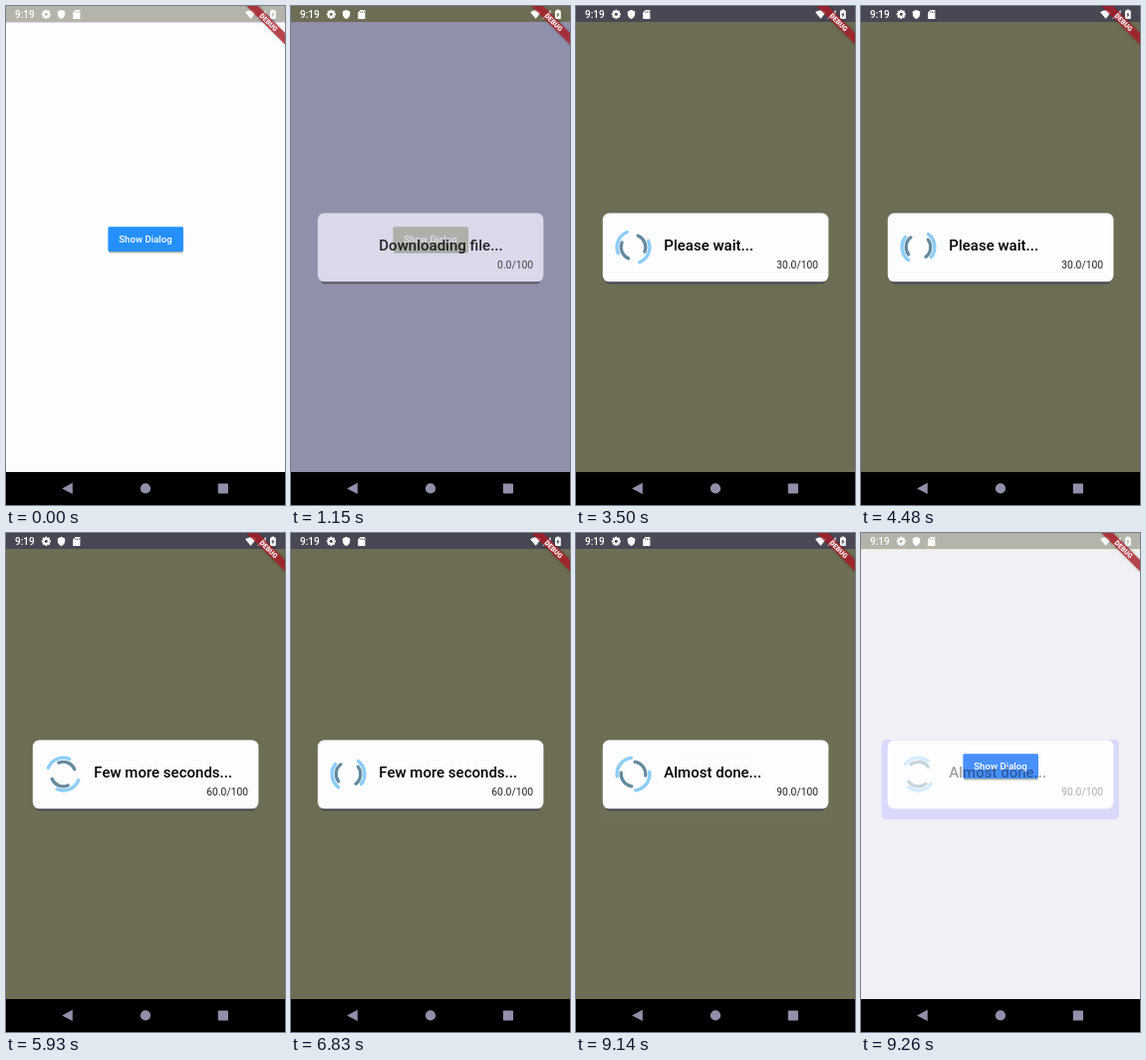
Animation, 280 px wide and 500 px high, one loop 9.71 s. Source, as an HTML page with a canvas:

```html
<!DOCTYPE html>
<html lang="en">
<head>
<meta charset="utf-8">
<title>Progress dialog</title>
<style>
  html, body { margin: 0; width: 100%; height: 100%; overflow: hidden; background: #fdfdff; }
  canvas, svg { position: absolute; left: 0; top: 0; width: 280px; height: 500px; }
  text { font-family: Roboto, "Noto Sans", sans-serif; }
</style>
</head>
<body>
<canvas id="stage"></canvas>
<svg viewBox="0 0 280 500">
  <text x="9" y="12" font-size="10" font-weight="500" fill="#fff">9:19</text>
  <text id="label" x="140" y="237" font-size="9.6" font-weight="500" text-anchor="middle">Show Dialog</text>
  <text id="message" x="88.3" y="245.2" font-size="15" font-weight="500"></text>
  <text id="count" x="243" y="262.8" font-size="10.3" text-anchor="end"></text>
  <text transform="translate(280 0) rotate(45)" x="0" y="25.6" font-size="6.9" font-weight="900" fill="#fff" text-anchor="middle">DEBUG</text>
</svg>
<script>
const LOOP = 9710;
const $ = id => document.getElementById(id);
const canvas = $('stage'), ctx = canvas.getContext('2d');
const dpr = window.devicePixelRatio || 1;
canvas.width = 280 * dpr;
canvas.height = 500 * dpr;
ctx.scale(dpr, dpr);

const closed = { bg: [253, 253, 255], bar: [180, 180, 170], edge: [220, 220, 245], panel: [253, 253, 255], btn: [36, 144, 255],
  label: [255, 255, 255], panelA: 0, btnA: 1, ink: 0, spin: 0, glow: 0, rim: 0 };
const opening = { bg: [144, 144, 171], bar: [109, 109, 85], edge: [144, 144, 171], panel: [217, 217, 234], btn: [176, 176, 170],
  label: [222, 222, 240], panelA: 1, btnA: 1, ink: .82, spin: 0, glow: 0, rim: .8 };
const open = { bg: [109, 109, 85], bar: [72, 72, 85], edge: [109, 109, 85], panel: [253, 253, 255], btn: [176, 176, 170],
  label: [253, 253, 255], panelA: 1, btnA: 0, ink: 1, spin: 1, glow: 0, rim: 1 };
const closing = { bg: [241, 241, 245], bar: [180, 180, 170], edge: [236, 236, 215], panel: [253, 253, 255], btn: [72, 144, 255],
  label: [255, 255, 255], panelA: 1, btnA: 1, ink: .36, spin: .36, glow: 1, rim: 0 };
const poses = [[0, closed], [1070, closed], [1150, opening], [1199, opening], [1200, open],
  [9140, open], [9260, closing], [LOOP, closing]];

// Ring position in 15 degree ticks
const ticks = [[1150, -28], [2510, 0], [2600, 0], [4480, 41], [4590, 41], [5930, 70], [7740, 110], [9260, 143], [LOOP, 143]];

const messages = [[7080, 'Almost done...', '90.0/100'], [5080, 'Few more seconds...', '60.0/100'],
  [3080, 'Please wait...', '30.0/100'], [0, 'Downloading file...', '0.0/100']];

const mix = (a, b, k) => a + (b - a) * k;
const rgb = c => `rgb(${c.map(Math.round).join()})`;

function span(keys, t) {
  let i = keys.length - 2;
  while (i > 0 && keys[i][0] > t) i--;
  const [t0, a] = keys[i], [t1, b] = keys[i + 1];
  return [a, b, Math.max(0, (t - t0) / (t1 - t0))];
}

function poseAt(t) {
  const [a, b, k] = span(poses, t), p = {};
  for (const n in a) p[n] = Array.isArray(a[n]) ? a[n].map((v, i) => mix(v, b[n][i], k)) : mix(a[n], b[n], k);
  return p;
}

function rect(x, y, w, h, color, r = 0) {
  ctx.fillStyle = color;
  ctx.beginPath();
  ctx.roundRect(x, y, w, h, r);
  ctx.fill();
}

function poly(color, ...pts) {
  ctx.fillStyle = color;
  ctx.beginPath();
  pts.forEach(([x, y]) => ctx.lineTo(x, y));
  ctx.fill();
}

function disc(x, y, r, color) {
  ctx.fillStyle = color;
  ctx.beginPath();
  ctx.arc(x, y, r, 0, 7);
  ctx.fill();
}

function statusIcons(bar) {
  const white = '#fff';
  // Gear
  for (let i = 0; i < 4; i++) {
    ctx.save();
    ctx.translate(40.3, 8.3);
    ctx.rotate(i * Math.PI / 4);
    rect(-1, -4.6, 2, 9.2, white);
    ctx.restore();
  }
  disc(40.3, 8.3, 3.5, white);
  disc(40.3, 8.3, 1.5, bar);
  // Shield
  ctx.fillStyle = white;
  ctx.beginPath();
  ctx.moveTo(55.5, 3.8);
  ctx.lineTo(59.2, 5.4);
  ctx.lineTo(59.2, 8);
  ctx.quadraticCurveTo(59, 11.5, 55.5, 13);
  ctx.quadraticCurveTo(52, 11.5, 51.8, 8);
  ctx.lineTo(51.8, 5.4);
  ctx.fill();
  // Memory card
  poly(white, [69.7, 4], [74.4, 4], [74.4, 13], [67.2, 13], [67.2, 6.5]);
  [69.5, 71.2, 72.9].forEach(x => rect(x, 5.2, .7, 1.8, bar));
  // Wifi
  ctx.fillStyle = white;
  ctx.beginPath();
  ctx.moveTo(245.6, 12.8);
  ctx.arc(245.6, 12.8, 8.6, -2.26, -.88);
  ctx.fill();
  // Signal and battery
  poly(white, [260.6, 4], [260.6, 12.6], [252, 12.6]);
  rect(265, 4.6, 5.8, 8.4, white, .8);
  rect(266.6, 3.6, 2.6, 1.4, white);
  poly(bar, [268.5, 5.8], [266.2, 9.2], [267.6, 9.2], [267.2, 11.8], [269.6, 8.2], [268.2, 8.2]);
}

function navBar() {
  const grey = '#9090aa';
  rect(0, 467, 280, 33, '#000');
  poly(grey, [56.2, 483.4], [66.8, 477.8], [66.8, 489]);
  disc(140, 483.4, 5.1, grey);
  rect(212.8, 478.4, 10.2, 10.2, grey, .8);
}

function banner() {
  ctx.save();
  ctx.translate(280, 0);
  ctx.rotate(Math.PI / 4);
  ctx.shadowColor = 'rgba(0,0,0,.4)';
  ctx.shadowBlur = 3 * dpr;
  rect(-28, 19.1, 56, 8.2, 'rgba(183,28,40,.75)');
  ctx.restore();
}

function ring(r, width, color, angle) {
  ctx.strokeStyle = color;
  ctx.lineWidth = width;
  for (const turn of [0, Math.PI]) {
    const mid = angle * Math.PI / 180 - Math.PI / 2 + turn;
    ctx.beginPath();
    ctx.arc(57.5, 241.6, r, mid - Math.PI / 4, mid + Math.PI / 4);
    ctx.stroke();
  }
}

function spinner(t, alpha) {
  const [a, b, k] = span(ticks, t);
  const angle = 7.5 + 15 * Math.floor(mix(a, b, k) + 1e-6);
  ctx.lineCap = 'round';
  ctx.globalAlpha = alpha;
  ring(16.4, 3.4, '#8ccdf8', angle);
  ring(12.3, 3.2, '#648a9e', -angle);
  ctx.globalAlpha = 1;
}

function draw(t) {
  const p = poseAt(t);
  rect(0, 0, 280, 500, rgb(p.bg));
  rect(0, 0, 280, 16, rgb(p.bar));
  rect(0, 16, 280, 1, rgb(p.edge));
  statusIcons(rgb(p.bar));

  ctx.globalAlpha = p.glow;
  rect(20.5, 207, 238.5, 80, '#d9d9fb', 5);
  ctx.globalAlpha = p.rim;
  rect(29.5, 270, 221, 8.6, '#4b4b52', 5);
  ctx.globalAlpha = p.panelA;
  rect(26.8, 207.5, 226.6, 68.8, rgb(p.panel), 6.5);
  ctx.globalAlpha = p.btnA;
  rect(103, 222, 74.8, 25.6, 'rgba(110,125,100,.55)', 1.5);
  rect(102.4, 221.3, 75.6, 24.7, rgb(p.btn), 1.4);
  ctx.globalAlpha = 1;

  if (p.spin > 0) spinner(t, p.spin);
  navBar();
  banner();

  const [, msg, count] = messages.find(m => t >= m[0]);
  $('label').setAttribute('fill', rgb(p.label));
  $('label').setAttribute('opacity', p.btnA);
  $('message').textContent = msg;
  $('count').textContent = count;
  $('message').setAttribute('opacity', p.ink);
  $('count').setAttribute('opacity', p.ink * .85);
}

const start = performance.now();
function tick() {
  draw((performance.now() - start) % LOOP);
  requestAnimationFrame(tick);
}
tick();
</script>
</body>
</html>
```
